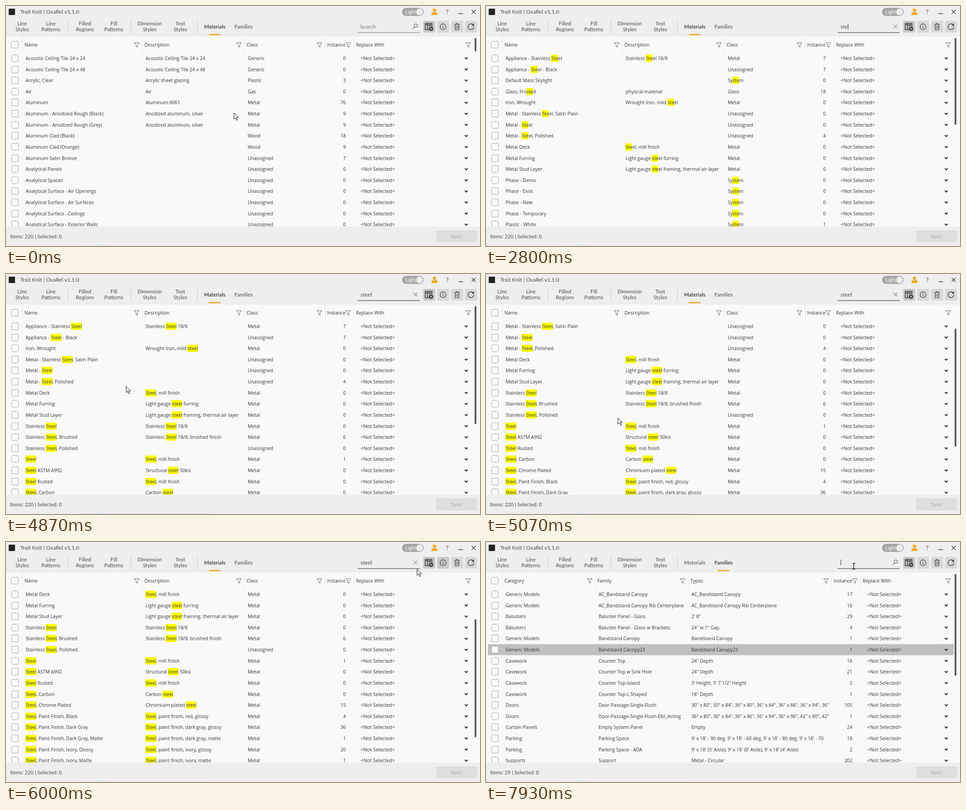
These frames come from a looping animation (1051 by 533 pixels, 8000 ms). An HTML page with a canvas:

```html
<!DOCTYPE html>
<html lang="en">
<head>
<meta charset="utf-8">
<title>Materials table</title>
<style>
html, body { margin: 0; width: 100%; height: 100%; overflow: hidden; background: #eee; }
canvas { display: block; }
</style>
</head>
<body>
<canvas id="stage" width="1051" height="533"></canvas>
<script>
const g = document.getElementById('stage').getContext('2d');
const LOOP = 8000, PITCH = 24.62, VISIBLE = 15.65;
const UI = 'Lato, "Open Sans", sans-serif', BODY = '"Open Sans", "Noto Sans", sans-serif';
const INK = '#333', BODY_SIZE = 10.4;

const parse = s => s.trim().split('\n').map(line => line.split('|'));
const materials = parse(`
Acoustic Ceiling Tile 24 x 24|Acoustic Ceiling Tile 24 x 24|Generic|0
Acoustic Ceiling Tile 24 x 48|Acoustic Ceiling Tile 24 x 48|Generic|0
Acrylic, Clear|Acrylic sheet glazing|Plastic|3
Air|Air|Gas|0
Aluminum|Aluminum 6061|Metal|76
Aluminum - Anodized Rough (Black)|Anodized aluminum, silver|Metal|9
Aluminum - Anodized Rough (Grey)|Anodized aluminum, silver|Metal|9
Aluminum Clad (Black)||Wood|18
Aluminum Clad (Orange)||Wood|9
Aluminum Satin Bronze||Unassigned|7
Analytical Panels||Unassigned|0
Analytical Spaces||Unassigned|0
Analytical Surface - Air Openings||Unassigned|0
Analytical Surface - Air Surfaces||Unassigned|0
Analytical Surface - Ceilings||Unassigned|0
Analytical Surface - Exterior Walls||Unassigned|0
Appliance - Stainless Steel|Stainless Steel 18/8|Metal|7
Appliance - Steel - Black||Unassigned|7
Default Mass Skylight||System|0
Glass, Frosted|physical material|Glass|18
Iron, Wrought|Wrought Iron, mild steel|Metal|0
Metal - Stainless Steel, Satin Plain||Unassigned|0
Metal - Steel||Unassigned|0
Metal - Steel, Polished||Unassigned|4
Metal Deck|Steel, mill finish|Metal|0
Metal Furring|Light gauge steel furring|Metal|0
Metal Stud Layer|Light gauge steel framing, thermal air layer|Metal|0
Phase - Demo||System|0
Phase - Exist||System|0
Phase - New||System|0
Phase - Temporary||System|0
Plastic - White||System|1
Stainless Steel|Stainless Steel 18/8|Metal|0
Stainless Steel, Brushed|Stainless Steel 18/8, brushed finish|Metal|6
Stainless Steel, Polished||Unassigned|0
Steel|Steel, mill finish|Metal|1
Steel ASTM A992|Structural steel 50ksi|Metal|0
Steel Rusted|Steel, mill finish|Metal|0
Steel, Carbon|Carbon steel|Metal|0
Steel, Chrome Plated|Chromiuim plated steel|Metal|15
Steel, Paint Finish, Black|Steel, paint finish, red, glossy|Metal|4
Steel, Paint Finish, Dark Gray|Steel, paint finish, dark gray, glossy|Metal|36
Steel, Paint Finish, Dark Gray, Matte|Steel, paint finish, dark gray, matte|Metal|1
Steel, Paint Finish, Ivory, Glossy|Steel, paint finish, ivory, glossy|Metal|20
Steel, Paint Finish, Ivory, Matte|Steel, paint finish, ivory, matte|Metal|1`);
const families = parse(`
Generic Models|AC_Bandstand Canopy|AC_Bandstand Canopy|17
Generic Models|AC_Bandstand Canopy Rib Centerplane|AC_Bandstand Canopy Rib Centerplane|16
Balusters|Baluster Panel - Glass|2' 8"|29
Balusters|Baluster Panel - Glass w Brackets|24" w 1" Gap|4
Generic Models|Bandstand Canopy|Bandstand Canopy|1
Generic Models|Bandstand Canopy23|Bandstand Canopy23|1
Casework|Counter Top|24" Depth|16
Casework|Counter Top w Sink Hole|24" Depth|21
Casework|Counter Top-Island|3' Height, 3' 7 1/2" Height|2
Casework|Counter Top-L Shaped|18" Depth|1
Doors|Door-Passage-Single-Flush|30" x 80", 30" x 84", 36" x 80", 36" x 84", 36" x 86", 36" x 94", 36"|105
Doors|Door-Passage-Single-Flush-Dbl_Acting|36" x 80", 36" x 84", 36" x 86", 36" x 94", 36" x 96", 42" x 80", 42"|1
Curtain Panels|Empty System Panel|Empty|24
Parking|Parking Space|9' x 18' - 90 deg, 9' x 18' - 60 deg, 9' x 18' - 80 deg, 9' x 18' - 70|18
Parking|Parking Space - ADA|9' x 18' (5' Aisle), 9' x 18' (8' Aisle), 9' x 18' (4' Aisle)|2
Supports|Support|Metal - Circular|202`);

const views = {
  materials: { heads: ['Name', 'Description', 'Class'], xs: [41, 307, 533.5, 712, 776] },
  families: { heads: ['Category', 'Family', 'Types'], xs: [41, 247, 453, 771, 835] }
};
const listSize = { '': 220, ste: 34, steel: 25 };

// Timeline: [start ms, value]
const typed = [[0, ''], [1730, 's'], [2130, 'st'], [2270, 'ste'], [3130, 'stee'], [3330, 'steel'], [6200, '']];
const filters = [[0, ''], [2800, 'ste'], [3800, 'steel'], [6870, '']];
const scrolls = [[0, 0], [5000, 3], [5330, 6], [6870, 0]];
const caretFlips = [870, 1470, 1730, 2930, 3130, 3800, 4390, 4870, 5400, 5930, 6200, 6870, 7800];
const FAMILIES_AT = 7130, SELECT_AT = 7400;
const pointer = [
  [0, 505, 237], [65, 505, 237], [130, 732, 111], [265, 732, 111], [400, 1018, 72], [530, 900, 56],
  [600, 855.5, 51.5], [4330, 855.5, 51.5], [4600, 520, 190], [4870, 266, 249], [4930, 266, 249],
  [5070, 292, 319], [5400, 300, 322], [5700, 640, 200], [5930, 972, 56], [6000, 911, 60],
  [6130, 908, 47], [6200, 908, 47], [6600, 531, 324], [6870, 531, 324], [7070, 527, 48],
  [7200, 527, 48], [7390, 640, 240], [7450, 640, 240], [7600, 815.5, 54], [8000, 815.5, 54]
];
const at = (steps, t) => steps.filter(s => s[0] <= t).pop()[1];

function pointerAt(t) {
  const i = pointer.findIndex(k => k[0] > t), [a, b] = [pointer[i - 1], pointer[i]];
  const p = (t - a[0]) / (b[0] - a[0]);
  return [a[1] + (b[1] - a[1]) * p, a[2] + (b[2] - a[2]) * p];
}

function text(s, x, y, { size = BODY_SIZE, font = BODY, color = INK, align = 'left', weight = 400 } = {}) {
  g.font = `${weight} ${size}px ${font}`;
  g.fillStyle = color;
  g.textAlign = align;
  g.fillText(s, x, y);
}
const label = (s, x, y, o) => text(s, x, y, { size: 11.6, font: UI, color: '#4a4a4a', ...o });

function rect(x, y, w, h, color) {
  g.fillStyle = color;
  g.fillRect(x, y, w, h);
}
function round(x, y, w, h, r, fill, line) {
  g.beginPath();
  g.roundRect(x, y, w, h, r);
  if (fill) { g.fillStyle = fill; g.fill(); }
  if (line) { g.strokeStyle = line; g.lineWidth = 1; g.stroke(); }
}
function path(x, y, d, { color = INK, width = 1, fill } = {}) {
  const p = new Path2D(d);
  g.save();
  g.translate(x, y);
  if (fill) { g.fillStyle = fill; g.fill(p); }
  if (width) { g.strokeStyle = color; g.lineWidth = width; g.stroke(p); }
  g.restore();
}
const disc = (x, y, r, color) => round(x - r, y - r, 2 * r, 2 * r, r, color);
const checkbox = (x, y, fill) => round(x, y, 15, 15, 2, fill, '#a3a3a3');
const funnel = x => path(x, 86, 'M-5.5-4.5H5.5L1.5 .5V5.5L-1.5 4V.5Z', { color: '#666' });

function titleBar() {
  rect(6, 6, 14, 14, '#222');
  label('Trait Knit | OvaRel v1.1.0', 31.5, 17, { size: 12 });
  round(878, 4, 48, 18, 9, '#a6a6a6');
  label('Light', 886, 17, { color: '#fff', size: 10.5 });
  disc(917, 13, 7.5, '#eee');
  disc(950, 9.5, 3.7, '#f5a623');
  path(950, 13, 'M-6.5 7V4Q-6.5 1-3 1H3Q6.5 1 6.5 4V7Z', { fill: '#f5a623', width: 0 });
  label('?', 978.5, 18, { size: 14, align: 'center' });
  path(1008, 17, 'M-5 0H5', { width: 1.5 });
  path(1037, 13, 'M-4.5-4.5L4.5 4.5M4.5-4.5L-4.5 4.5', { width: 1.3 });
}

function toolbar(onFamilies, infoHot) {
  [['Line', 'Styles', 36], ['Line', 'Patterns', 99.5], ['Filled', 'Regions', 175], ['Fill', 'Patterns', 239],
    ['Dimension', 'Styles', 318.5], ['Text', 'Styles', 386.5]].forEach(([a, b, x]) => {
    label(a, x, 43, { align: 'center' });
    label(b, x, 56, { align: 'center' });
  });
  [137, 276.5, 424].forEach(x => rect(x, 33, 1, 26, '#c4c4c4'));
  [['Materials', 462.8, !onFamilies], ['Families', 526.8, onFamilies]].forEach(([s, x, active]) => {
    label(s, x, 49.5, { align: 'center', color: active ? '#222' : '#4a4a4a', weight: active ? 500 : 400 });
    if (active) rect(x - 13, 62, 26, 3, '#e9b03c');
  });

  [925, 956, 987, 1018].forEach((x, i) =>
    round(x, 33, 26.5, 26, 3, i === 0 || (i === 1 && infoHot) ? '#c8c8c8' : '#d8d8d8'));
  path(937, 46, 'M-7.5-7.5H7.5V0M-7.5-7.5V6.5H1M-7.5-4H7.5M-2.5-7.5V6.5M2.5-7.5V0', { width: 1.4 });
  g.beginPath();
  g.arc(942.5, 50.5, 3, 0, 7);
  g.lineWidth = 2.2;
  g.strokeStyle = INK;
  g.stroke();
  for (let a = 0; a < 8; a++) {
    const r = a * Math.PI / 4;
    disc(942.5 + 4.3 * Math.cos(r), 50.5 + 4.3 * Math.sin(r), 1, INK);
  }
  path(969, 46, 'M6.5 0A6.5 6.5 0 1 1-6.5 0A6.5 6.5 0 1 1 6.5 0M0-1V3.5M0-3.7V-2.3', { width: 1.2 });
  path(1000, 46, 'M-6-5H6M-2-5V-7H2V-5M-4.5-5L-4 7H4L4.5-5M-1.7-2V4.5M1.7-2V4.5', { width: 1.1 });
  path(1031, 46, 'M5.4-3.6A6.5 6.5 0 1 0 6.5 0M6-7V-3H2', { width: 1.3 });
}

function search(query, focused, caret) {
  rect(780, 58.5, 137, 1, focused ? '#222' : '#777');
  if (focused) label(query, 786, 49.5, { size: 12.2 });
  else label('Search', 785, 49.5, { color: '#777', size: 11.8 });
  if (caret) rect(786.4 + (query ? g.measureText(query).width : 0), 39, 1, 13, '#222');
  if (query) path(908, 45.5, 'M-4.5-4.5L4.5 4.5M4.5-4.5L-4.5 4.5', { color: '#555' });
  else path(908.5, 44, 'M4-.5A3.6 3.6 0 1 1-3.2-.5A3.6 3.6 0 1 1 4-.5M-2.2 2.2L-6.5 6.5', { color: '#555', width: 1.1 });
}

function cell(s, x, y, query) {
  const i = query ? s.toLowerCase().indexOf(query) : -1;
  if (i >= 0) {
    g.font = `${BODY_SIZE}px ${BODY}`;
    g.textAlign = 'left';
    const edge = n => Math.floor(x + g.measureText(s.slice(0, n)).width);
    const left = edge(i);
    rect(left, y - 12, edge(i + query.length) - left, 16, '#ff0');
  }
  text(s, x, y);
}

function table(view, rows, query, total, first, selected) {
  const { heads, xs } = view;
  rect(0, 68, 1051, 422, '#f9f9f9');
  checkbox(12, 78.5);
  [...heads, 'Instance', 'Replace With'].forEach((s, i) => {
    rect(xs[i] - 5, 69, 1, 35, '#e4e4e4');
    text(s, xs[i], 90);
    funnel(i < 4 ? xs[i + 1] - 17 : 1025);
  });
  g.save();
  g.beginPath();
  g.rect(0, 104, 1051, 386);
  g.clip();
  rows.slice(first, first + 16).forEach((row, i) => {
    const y = 116 + i * PITCH, base = Math.round(y + 4);
    if (i === selected) rect(4, y - 12.3, 1033, PITCH, '#c0c0c0');
    checkbox(12.5, Math.round(y) - 7.5, '#fbfbfb');
    row.slice(0, 3).forEach((s, c) => cell(s, xs[c] + 2.4, base, query));
    text(row[3], xs[4] - 22.5, base, { align: 'right' });
    text('<Not Selected>', xs[4] + 10.3, base, { size: 10.8 });
    path(1020.5, y, 'M-3.2-1.6L0 1.6L3.2-1.6', { width: 2, color: '#222' });
  });
  g.restore();
  const unit = 419 / total;
  round(1039, 71 + first * unit, 4, VISIBLE * unit, 2, '#5c5c5c');
}

function footer(count) {
  label(`Items: ${count} | Selected: 0`, 9, 515.5, { size: 11.2 });
  round(954, 498, 90.5, 27, 2, '#dedede');
  label('Sync', 999, 515.5, { align: 'center', color: '#aaa' });
  rect(163, 532, 292, 1, '#d9d9d9');
  rect(205, 532, 19, 1, '#9fd0ea');
}

function cursor([x, y]) {
  if (x > 780 && x < 900 && y > 36 && y < 60)
    path(x, y, 'M-3-6.5H-1L0-5.5L1-6.5H3M0-5.5V5.5M-3 6.5H-1L0 5.5L1 6.5H3', { color: '#111', width: 1.3 });
  else
    path(x, y, 'M.5 .5V14.3L3.7 11.3L6 16.8L8.4 15.8L6 10.5H10.2Z', { color: '#111', fill: '#fff' });
}

function draw(t) {
  const onFamilies = t >= FAMILIES_AT;
  const query = at(filters, t);
  const focused = (t >= 870 && t < FAMILIES_AT) || t >= 7800;
  const caret = caretFlips.filter(f => f <= t).length % 2 === 1;
  rect(0, 0, 1051, 533, '#eee');
  titleBar();
  toolbar(onFamilies, t >= 5880 && t < 6070);
  search(at(typed, t), focused, caret);
  if (onFamilies) table(views.families, families, '', 29, 0, t >= SELECT_AT ? 5 : -1);
  else {
    const rows = materials.filter(r => r.slice(0, 3).some(s => s.toLowerCase().includes(query)));
    table(views.materials, rows, query, listSize[query], at(scrolls, t), -1);
  }
  footer(onFamilies ? 29 : 220);
  // The pointer hides while typing
  if (t < 1600 || t >= 4330) cursor(pointerAt(t));
}

const start = performance.now();
function tick() {
  draw((performance.now() - start) % LOOP);
  requestAnimationFrame(tick);
}
tick();
</script>
</body>
</html>
```
